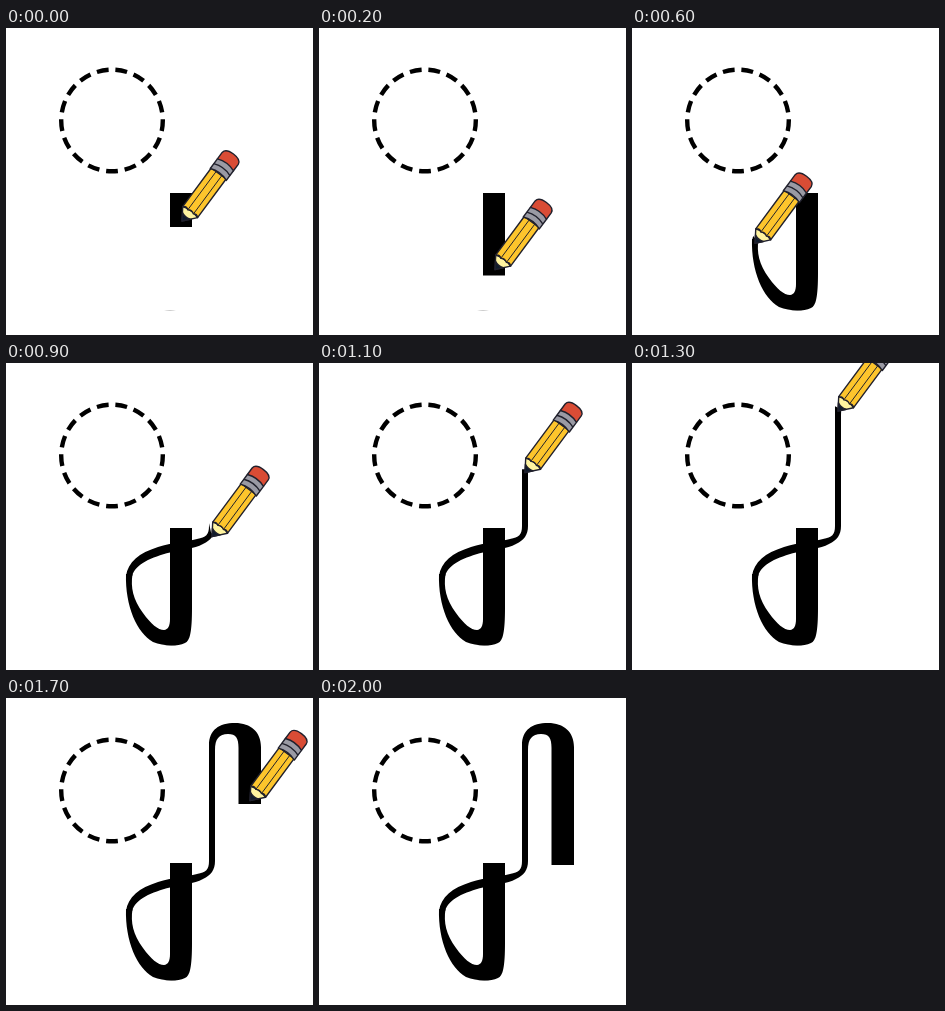
Animation of 307x307 px, one loop 4 s. Source, as an HTML page without scripts:

```html
<!DOCTYPE html>
<html lang="en">
<head>
<meta charset="utf-8">
<title>Pencil writing a letter</title>
<style>
  /* Distance the pencil has travelled; the ink masks and the pencil all follow it */
  @property --d { syntax: "<number>"; inherits: true; initial-value: 0; }

  html, body { margin: 0; width: 100%; height: 100%; overflow: hidden; background: #fff; }
  svg { display: block; width: 100vw; height: 100vh; animation: write 4s infinite; }

  .ring { fill: none; stroke: #000; stroke-width: 4.4; stroke-dasharray: 1.9 1.1; stroke-dashoffset: .95; }

  .reveal { fill: none; stroke: #fff; stroke-linejoin: round; stroke-dasharray: 700; }
  .down { stroke-width: 36; stroke-dashoffset: calc(661 - var(--d)); }
  .up { stroke-width: 30; stroke-dashoffset: calc(857 - var(--d)); }

  .pencil {
    stroke: #20202c; stroke-width: 1.4; stroke-linejoin: round;
    offset-path: path("M176 193V250L168 268L148 270L140 267L130 244L123 215L160 184L206 174V45L214 31H228L244 29V164");
    offset-distance: calc(var(--d) * 1px);
    offset-rotate: 0deg;
    animation: lift 4s step-end infinite;
  }

  /* One pose every 100 ms */
  @keyframes write {
    0% { --d: 0; animation-timing-function: steps(4); }
    10% { --d: 97; animation-timing-function: steps(2); }
    15% { --d: 160; animation-timing-function: steps(5); }
    27.5% { --d: 320; animation-timing-function: steps(8); }
    47.5%, 100% { --d: 566; }
  }
  @keyframes lift {
    0% { visibility: visible; }
    50%, 100% { visibility: hidden; }
  }
</style>
</head>
<body>
<svg viewBox="0 0 307 307">
  <defs>
    <mask id="down" maskUnits="userSpaceOnUse" x="0" y="0" width="307" height="307">
      <path class="reveal down" d="M176 160V250L168 268L148 270L140 267L130 244L123 209"/>
    </mask>
    <mask id="up" maskUnits="userSpaceOnUse" x="0" y="0" width="307" height="307">
      <path class="reveal up" d="M123 215L160 184L206 174V45L214 31H228L244 29V170"/>
    </mask>
  </defs>

  <circle class="ring" cx="106" cy="92.5" r="50.8" pathLength="51" transform="rotate(90 106 92.5)"/>

  <path d="M158 283Q164 281.4 170 283Z" fill="#bbb"/>
  <path mask="url(#down)" d="M164 165H186V245C186 269 184 278 179 280C170 284 157 283 147 279C131 270 119 243 120 211H126.500C124.500 225 127 236 137 250C145 261 152 267 158 267C162 266.500 164 263 164 256Z"/>
  <path mask="url(#up)" d="M120 213C122 199 133 190 152 184C166 179.500 180 178.500 191 176C200 174 203 172 203 163V47C203 32 213 25 229 25C245 25 255 34 255 49V167H232.500V50C232.500 40 230 36 222 36C213 36 209 41 209 52V163C209 172 205 177 197 181C188 186 176 186.500 164 189.500C146 194 129 201 126.200 213Z"/>

  <g class="pencil">
    <g transform="rotate(36.500)">
      <path fill="#fff4a0" d="M0 0L-8 -12Q1.500 -15 10.500 -12Z"/>
      <path fill="#101c2c" d="M0 0L-4.600 -7Q0 -4.500 5.500 -6.300Z"/>
      <path fill="#fdc52c" d="M-8 -12V-60H10.500V-12Q7.500 -15 5 -12.500Q1.500 -15 -2 -12.500Q-5 -15 -8 -12Z"/>
      <path fill="none" stroke-width=".9" d="M-2 -13V-60M5 -13V-60"/>
      <path fill="#d94c35" d="M-8.500 -71V-79Q-8 -84.500 1.500 -84.500Q11 -84.500 11.500 -79V-71Z"/>
      <path fill="#9a9aa4" d="M-8.500 -59V-71Q1.500 -75 11.500 -71V-59Q1.500 -63 -8.500 -59Z"/>
      <path fill="none" d="M-8.500 -65Q1.500 -69 11.500 -65"/>
    </g>
  </g>
</svg>
</body>
</html>
```
